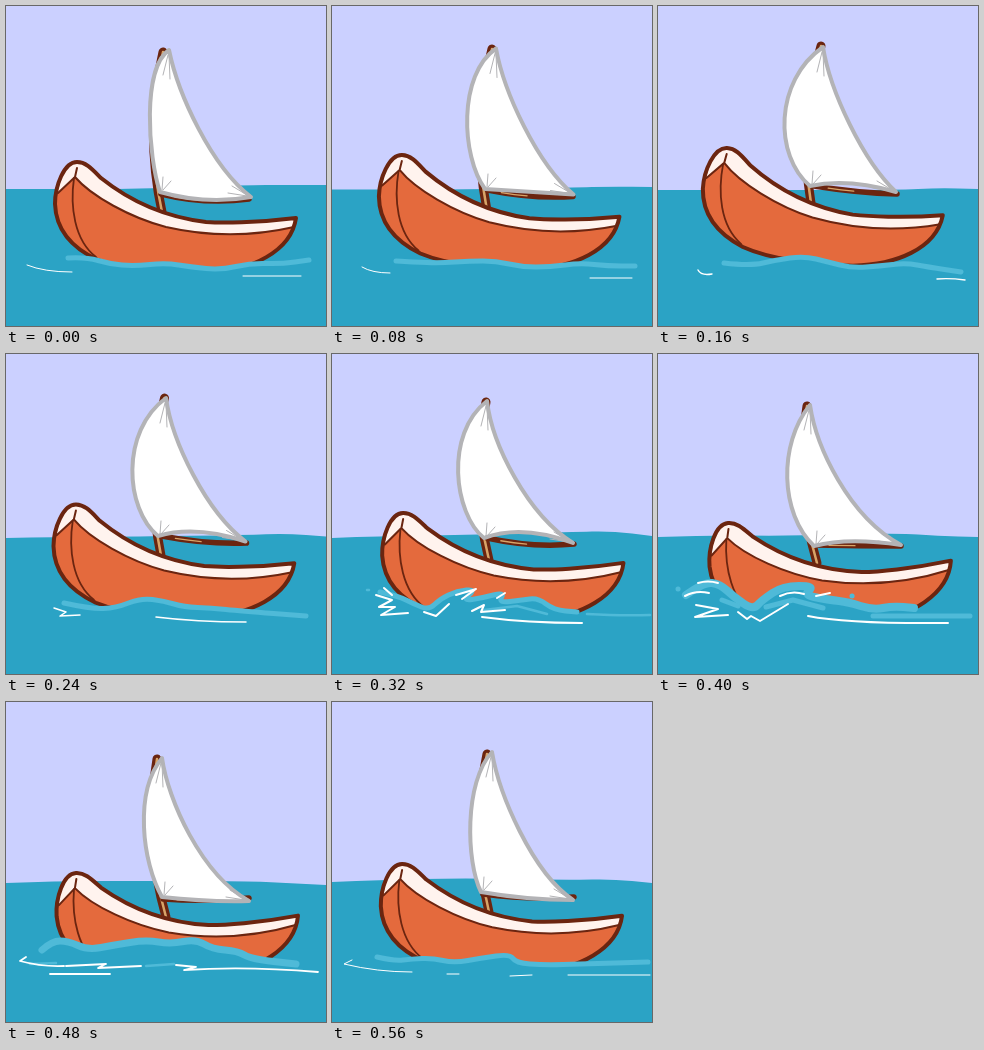
An HTML page that plays this animation: 320 px wide and 320 px high, repeating every 0.64 s.

```html
<!DOCTYPE html>
<html lang="en">
<head>
<meta charset="utf-8">
<title>Sailing boat</title>
<style>
  html, body { margin: 0; width: 100%; height: 100%; overflow: hidden; background: #cbd0ff; }
  svg { display: block; width: 100%; height: 100%; }
  path { fill: none; stroke-linecap: round; stroke-linejoin: round; }
  .line { stroke: #6b2510; }
  .tan { stroke: #d8a468; }
  .grey { stroke: #b3b3b6; }
  .sea { fill: #2ba3c5; }
</style>
</head>
<body>
<svg viewBox="0 0 320 320">
  <path id="sea" class="sea"/>
  <path id="mast" class="line" stroke-width="9"/>
  <path id="mastCore" class="tan" stroke-width="2.5"/>
  <path id="boom" class="line" stroke-width="5.5"/>
  <path id="boomCore" class="tan" stroke-width="1.3" stroke-dasharray="26 200" stroke-dashoffset="-14"/>
  <path id="sail" class="grey" stroke-width="4" style="fill:#fff"/>
  <path id="creases" class="grey" stroke-width="1"/>
  <g id="hull">
    <path id="body" style="fill:#e46a3d"/>
    <path d="M71 156C60 157 54 173 52 187L69 171C85 190 125 212 160 221C195 229 240 232 288 221L290 212C250 217 215 217 200 216C150 210 115 188 95 172C86 163 80 156 71 156Z" style="fill:#fff3ee"/>
    <path class="line" stroke-width="2" d="M52 187L69 171C85 190 125 212 160 221C195 229 240 232 288 221M69 171L71 162"/>
    <path class="line" stroke-width="1.8" d="M68 172C64 200 68 234 90 251"/>
    <path class="line" stroke-width="4" d="M71 156C58 156 49 180 49 198C50 225 68 243 92 254C120 265 165 268 203 267C245 264 285 246 290 212C250 217 215 217 200 216C150 210 115 188 95 172C86 163 80 156 71 156Z"/>
  </g>
  <path id="water" class="sea"/>
  <path id="foam" stroke="#4fbad8"/>
  <path id="spray" stroke="#4fbad8" stroke-width="5"/>
  <path id="white" stroke="#fff"/>
</svg>
<script>
const $ = id => document.getElementById(id);
const set = (id, attrs) => {
  for (const k in attrs) $(id).setAttribute(k, attrs[k]);
};
const nums = s => s.match(/-?[\d.]+/g).map(Number);

$('body').setAttribute('d', document.querySelector('#hull path:last-child').getAttribute('d'));

const STEP = 80;
// Position of every step on the list of key poses; halves are in-betweens.
const keys = [0, 0.5, 1, 1.5, 2, 3, 4, 5];

// Bow tip, stern tip
const hulls = [
  '71 156 290 212', '69 142 287 210', '71 159 292 209',
  '70 169 295 207', '70 171 294 214', '70 162 291 214'
];
// Mast top, mast foot
const masts = [
  '157 46 156 206', '163 40 153 197', '154 48 157 206',
  '149 52 159 209', '151 57 160 215', '155 52 157 210'
];
// Head, leech, clew, foot, tack, luff
const sails = [
  'M163 44C172 88 205 160 245 191Q200 199 154 186C142 150 136 62 163 44Z',
  'M165 41C172 85 205 155 238 186Q190 172 152 180C116 150 116 75 165 41Z',
  'M155 47C160 90 195 160 241 189Q190 170 152 184C122 160 112 80 155 47Z',
  'M152 51C158 92 190 162 243 191Q190 183 156 192C122 160 120 90 152 51Z',
  'M156 56C162 98 195 172 243 199Q200 200 156 195C136 160 128 90 156 56Z',
  'M160 50C167 92 200 170 241 198Q195 198 149 190C134 160 132 80 160 50Z'
];
const booms = [
  'M155 188Q200 199 243 193', 'M156 180Q200 187 239 188',
  'M155 184Q200 194 242 190', 'M157 191Q200 192 243 192',
  'M157 197Q200 200 243 196', 'M151 192Q195 198 242 195'
];
// Horizon heights at x = 0, 50, 130, 240, 280, 320
const horizons = [
  '183 183 183 179 179 179', '184 184 184 184 182 183',
  '184 182 181 178 177 182', '183 181 182 179 182 183',
  '181 179 179 179 181 183', '180 178 176 178 177 181'
];

// Waterline along the hull, one for each step
const foams = [
  '62 252 80 251 104 258 128 260 160 257 185 261 215 264 245 257 275 258 303 254',
  '64 255 82 256 108 257 138 255 164 255 190 261 218 261 248 257 276 260 303 260',
  '66 257 92 260 118 254 146 250 170 256 194 262 222 260 248 257 270 261 303 266',
  '58 249 85 255 110 254 135 244 158 247 178 253 205 254 235 257 300 262',
  '48 238 66 242 82 250 97 256 108 245 125 237 144 235 130 247 150 244 173 238 166 249 190 246 206 244 222 256 245 258',
  '28 241 46 228 62 230 76 243 95 256 104 246 125 232 157 232 145 241 172 246 190 248 215 256 235 252 256 254',
  '36 248 46 239 62 239 82 248 108 243 140 238 165 242 190 237 206 247 232 249 245 257 290 262',
  '45 255 62 259 80 257 100 256 122 261 150 256 178 252 184 261 212 263 250 262 316 260'
];
const foamWidths = [5, 5, 5, 5, 5, 8, 7, 5];

const whites = [
  'M21 259Q38 266 66 266M237 270H295',
  'M30 261Q40 267 58 267M258 272H300',
  'M40 264Q43 270 54 268M279 273Q292 272 307 274',
  'M48 254L60 258L54 262L74 261M150 263Q190 268 240 268',
  'M52 234L60 241M44 241L60 246L47 253L63 253L49 261L76 259M92 258L104 262L117 250M124 241L144 235L130 245M140 257L152 251L149 258L173 256M165 244L173 239M150 263Q195 269 250 269',
  'M27 242Q38 236 51 239M40 229Q50 226 60 229M38 251L60 255L37 263L70 261M80 258L89 265L93 262L102 267L130 250M122 242Q134 236 146 240M158 242L172 239M150 262Q190 270 290 269',
  'M20 255L14 259Q36 265 58 264M60 264L100 262L92 266L135 264M44 272H104M170 263L190 265L178 268Q240 264 312 270',
  'M20 258L12 262Q45 270 80 270M115 272H127M178 274L200 273M236 273H318'
];
const whiteWidths = [1, 1, 1.4, 1.5, 2, 2, 1.8, 1];

const sprays = {
  4: 'M35 236h2M152 256L185 252L215 260M255 260Q290 262 318 261',
  5: 'M20 235h.1M194 242h.1M64 246L80 252M108 253L135 246L165 254M215 262L312 262',
  6: 'M24 262L50 261M140 264L168 262'
};

function mix(list, key) {
  const a = list[Math.floor(key)], b = nums(list[Math.ceil(key)]);
  let i = 0;
  return a.replace(/-?[\d.]+/g, n => +n + (b[i++] - n) * (key % 1));
}

// Smooth curve through the midpoints of a run of points
function curve(n) {
  let d = `M${n[0]} ${n[1]}`;
  for (let i = 2; i < n.length - 2; i += 2)
    d += `Q${n[i]} ${n[i + 1]} ${(n[i] + n[i + 2]) / 2} ${(n[i + 1] + n[i + 3]) / 2}`;
  return d + `L${n.at(-2)} ${n.at(-1)}`;
}

function drawBoat(key) {
  const [bx, by, sx, sy] = nums(mix(hulls, key));
  const turn = (Math.atan2(sy - by, sx - bx) - Math.atan2(56, 219)) * 180 / Math.PI;
  set('hull', { transform: `translate(${bx} ${by}) rotate(${turn}) translate(-71 -156)` });

  const [tx, ty, fx, fy] = nums(mix(masts, key));
  const mast = `M${tx} ${ty}Q${(tx + fx) / 2 - 18} ${(ty + fy) / 2} ${fx} ${fy}`;
  set('mast', { d: mast });
  set('mastCore', { d: mast });

  const boom = mix(booms, key);
  set('boom', { d: boom });
  set('boomCore', { d: boom });

  const sail = mix(sails, key), p = nums(sail);
  const [hx, hy] = p, [cx, cy] = p.slice(6), [kx, ky] = p.slice(10);
  set('sail', { d: sail });
  set('creases', {
    d: `M${hx - 1} ${hy + 5}l-5 20M${hx} ${hy + 5}l1 24` +
       `M${cx - 4} ${cy - 2}l-15 -9M${cx - 4} ${cy - 1}l-19 -3` +
       `M${kx + 2} ${ky - 2}l1 -13M${kx + 3} ${ky - 2}l8 -9`
  });
}

function drawSea(step, key) {
  const ys = nums(mix(horizons, key));
  const line = [0, 50, 130, 240, 280, 320].flatMap((x, i) => [x, ys[i]]);
  set('sea', { d: curve(line) + 'V320H0Z' });

  const pts = nums(foams[step]), foam = curve(pts);
  set('water', { d: foam + `V285H${pts[0]}Z` });
  set('foam', { d: foam, 'stroke-width': foamWidths[step] });
  set('spray', { d: sprays[step] || '', 'stroke-width': step === 5 ? 5 : 2.5 });
  set('white', { d: whites[step], 'stroke-width': whiteWidths[step] });
}

let shown = -1;
function draw() {
  const step = Math.floor(performance.now() / STEP) % keys.length;
  if (step !== shown) {
    shown = step;
    drawBoat(keys[step]);
    drawSea(step, keys[step]);
  }
  requestAnimationFrame(draw);
}
draw();
</script>
</body>
</html>
```
